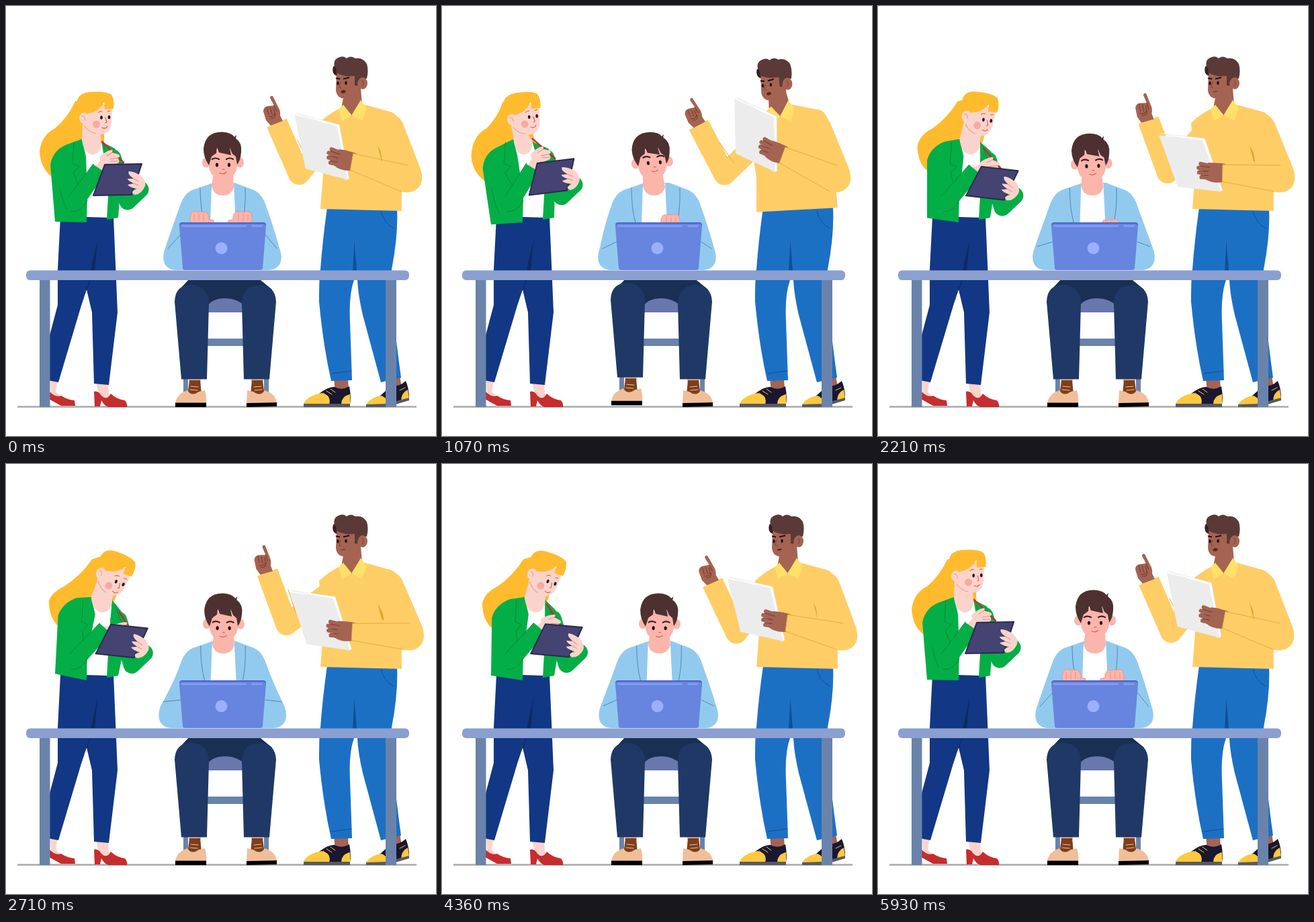
Write an HTML page that moves like this. It is 640 px wide and 640 px high and loops after 6000 ms.

```html
<!DOCTYPE html>
<html lang="en">
<head>
<meta charset="utf-8">
<title>Team at work</title>
<style>
html, body { margin: 0; width: 100%; height: 100%; overflow: hidden; background: #fff; }
svg { display: block; width: 100vw; height: 100vh; }
.l { fill: none; stroke-width: 1; stroke-linecap: round; stroke-linejoin: round; }
.arm { fill: none; stroke-linejoin: round; }
</style>
</head>
<body>
<svg viewBox="0 0 640 640">
<path d="M17 596.5H611" stroke="#a9a9a9" stroke-width="2.5"/>

<!-- standing man -->
<g>
  <path fill="#a56352" d="M488 554H509L510 572L490 574ZM570 552L586 550L589 568L572 572Z"/>
  <path fill="#1a1730" d="M466 577Q480 566 489 567Q500 573 511 566Q514 580 512 593H462ZM556 581Q566 572 573 566Q585 567 595 558Q600 570 600 583L570 593H550Z"/>
  <path fill="#ffc83e" d="M443 592Q448 580 470 576Q485 580 481 593H443ZM499 593Q499 580 512 578V593ZM536 593Q543 582 559 580Q570 585 566 593ZM588 588Q588 576 598 571L600 584Z"/>
  <path class="l" stroke="#ffc83e" d="M472 576l7 5M477 573l8 5M483 570l7 5M586 572l8 -4"/>
  <path fill="#555a66" d="M443 592H512V597H443ZM536 593L566 592L600 583V587L566 597H536Z"/>
  <path fill="#1c70c4" d="M478 300H582Q584 340 574 392V408Q575 460 588 553L558 560L531 460Q524 430 523 408H518Q510 430 512 470L515 557L484 558Q472 505 466 440Q466 400 468 392Q471 350 478 300Z"/>
  <path fill="#0d4f98" d="M518.5 350L516 394H522Z"/>
  <path class="l" stroke="#0d4f98" d="M558 305Q562 323 577 331M485 547L514 543"/>
  <path id="mNeck" fill="#a56352"/>
  <g id="mBody">
    <path fill="#ffcd66" d="M500 151L515 164L534 147L574 158Q588 164 588 200L589 305L468 302L472 250L466 174Q480 160 500 151Z"/>
    <path fill="#e0a52c" d="M553 207L559 231L568 236Z"/>
    <path fill="#ffe068" d="M502 147L495 153L500 171L515 163ZM528 140L537 152L530 171L514 163Z"/>
  </g>
  <g id="mHead">
    <path fill="#a56352" d="M492 99L491 125Q492 137 504 138Q520 138 528 127V99Z"/>
    <path fill="#3a1f20" d="M492 104Q484 101 487 90L494 88Z"/>
    <path fill="#5b3936" d="M491 99Q493 93 489 91Q486 79 497 76Q503 74 507 78Q513 73 520 78Q531 76 537 86Q540 96 537 108H529Q523 108 523 119L519 118V104Q503 106 491 99Z"/>
    <ellipse cx="531" cy="115" rx="7" ry="9" fill="#a56352"/>
    <path class="l" stroke="#7d4237" d="M530 111q4 3 0 8M498 113l-2 8 3 1"/>
    <path d="M491 107.5L497 108.5M502 108.5L511 106.5" stroke="#1d1015" stroke-width="2"/>
    <ellipse cx="494" cy="115" rx="1.700" ry="2.700" fill="#1d1015"/><ellipse cx="506" cy="114.500" rx="1.700" ry="2.700" fill="#1d1015"/>
    <ellipse id="mMouth" cx="502" cy="127.500" rx="3.500" fill="#5a2522" transform="rotate(-8 502 127)"/>
  </g>
  <path id="mArm" class="arm" stroke="#ffcd66" stroke-width="32"/>
  <path id="mArmLine" class="l" stroke="#e7ab3a"/>
  <g id="mFist">
    <path fill="#a56352" d="M383 157Q383 150 390 149L399 148L393 137Q393 133 397 134L405 150Q409 156 408 163L412 171L394 178L387 170Z"/>
    <path class="l" stroke="#74392f" d="M399 148l4 9M388 151l3 10M393 151l3 10M398 152l2 8q-3 6-9 4M401 160q0 8-7 7"/>
  </g>
  <g id="mGrip">
    <path fill="#fff" stroke="#e3e3e3" stroke-width=".6" d="M-81 -49H-15L20 25L15 28L-20 -43Z"/>
    <path fill="#ececec" d="M-83 -46H-18L18 27H-47Z"/>
    <g transform="rotate(-4)">
      <path fill="#a56352" d="M21 -13V13Q4 18 -8 11L-13 -6L-5 -14Q8 -15 21 -13Z"/>
      <path class="arm" stroke="#a56352" stroke-width="6" stroke-linecap="round" d="M0 -9L-16 -12M-2 -4L-19 -6M-3 2L-18 1M-3 8L-14 8"/>
      <path class="l" stroke="#74392f" d="M-2 -7L-17 -9M-4 -1L-18 -2M-4 5L-15 5"/>
    </g>
  </g>
  <path id="mSleeve" fill="#ffcd66"/>
  <path id="mSleeveLine" class="l" stroke="#e7ab3a"/>
</g>

<!-- woman -->
<g>
  <path fill="#fbd3cb" d="M66 555H77L74 574L84 584L67 578ZM134 560H152L153 577L162 584L140 585Z"/>
  <path fill="#c62d2f" d="M64 573Q73 583 82 580Q91 586 102 587L103 595H82L64 585ZM131 574Q137 572 142 580Q150 588 156 577Q164 585 177 587Q181 592 180 597H153Q146 595 142 587L140 596H132Z"/>
  <path fill="#123784" d="M81 314H160L164 408L166 456L153 564L131 562L128 456L120 422L112 446L78 560L62 557L65 490L77 445V392Z"/>
  <path fill="#0b2b60" d="M136 349L126 394H132Z"/>
  <path class="l" stroke="#0b2b60" d="M126 405L120 423"/>
  <path id="wTail" fill="#ffbb2e"/>
  <path id="wShirt" fill="#fff"/>
  <path id="wArmBack" class="arm" stroke="#03ae46" stroke-width="25" stroke-linecap="round"/>
  <path id="wPanel" fill="#03ae46"/>
  <path id="wJacket" fill="#03ae46"/>
  <path id="wLines" class="l" stroke="#068a36"/>
  <path id="wNeck" fill="#fbd3cb"/>
  <g id="wHead">
    <path fill="#fbd3cb" d="M115 158V178Q122 191 140 191.500Q155 191 157 174L158 148L130 144Z"/>
    <path fill="#ffbb2e" d="M109 163Q97 130 125 128Q148 126 157 132Q162 141 160 153L147 154L146 143Q138 158 122 160L119 164Z"/>
    <ellipse cx="116" cy="167" rx="7" ry="8.500" fill="#fbd3cb"/>
    <path class="l" stroke="#e09a92" d="M113 164q5 0 5 6M117 179q7 9 17 11"/>
    <g id="wFace">
      <circle cx="134.500" cy="176" r="5.500" fill="#f5aba0"/>
      <ellipse cx="142" cy="166" rx="1.900" ry="2.800" fill="#201a26"/><ellipse cx="153.500" cy="165.500" rx="1.900" ry="2.800" fill="#201a26"/>
      <path class="l" stroke="#b8741c" d="M137 159q3-3 6-2M151 157l4-1"/>
      <path class="l" stroke="#d2504b" d="M148 166l2 7-2 1M143 181q5 3 8-2"/>
    </g>
  </g>
  <path id="wWrist" class="arm" stroke="#fbd3cb" stroke-width="13"/>
  <g id="wHand">
    <path d="M-11 -25L21 6" stroke="#c62d2f" stroke-width="2.600" stroke-linecap="round"/>
    <path fill="#fbd3cb" d="M-15 -2Q-8 -10 3 -13Q6 -12 4 -9L14 -6Q17 -2 12 -1Q16 3 13 7L4 10H-12Z"/>
    <path class="l" stroke="#e48f88" d="M4 -9L-4 -4M13 -1L1 1M12 4H2"/>
  </g>
  <path id="wArm" class="arm" stroke="#03ae46" stroke-width="23"/>
  <path id="wArmLine" class="l" stroke="#068a36"/>
  <g id="wTablet">
    <path fill="#444372" stroke="#2b2a50" stroke-width="2" stroke-linejoin="round" d="M147 236L202 235L187 281L130 282Z"/>
    <path fill="#fbd3cb" d="M183 246Q190 246 200 252Q209 260 207 268Q202 280 192 281Q186 279 189 275L195 272Q184 270 181 266L190 264Q181 260 181 257L190 257Q180 250 183 246Z"/>
    <path class="l" stroke="#e48f88" d="M190 257l7 4M190 264l7 3"/>
  </g>
</g>

<!-- seated man -->
<g>
  <path id="sJacket" fill="#92caef"/>
  <path id="sShirt" fill="#fff"/>
  <path id="sLines" class="l" stroke="#5487ae"/>
  <path id="sNeck" fill="#fbb5ab"/>
  <g id="sHead">
    <ellipse cx="298" cy="233" rx="6" ry="7.500" fill="#fbb5ab"/><ellipse cx="348" cy="233" rx="6" ry="7.500" fill="#fbb5ab"/>
    <path fill="#fbb5ab" d="M302 215V240Q305 257 323 258Q341 257 344 240V215Z"/>
    <path fill="#4d302f" d="M302 237Q294 226 294 212Q297 187 322 187.500Q335 188 340 195L343 192L342 197Q352 204 350 218Q349 230 344 236L342 224L337 220L333 211L335 222L317 218L314 211L313 219L306 224Z"/>
    <g id="sFace">
      <path class="l" style="stroke-width:2.200" stroke="#3a2021" d="M307 228Q311 225 317 228M328 228Q333 225 338 228"/>
      <ellipse cx="314" cy="236.500" rx="2.100" ry="2.900" fill="#201519"/><ellipse cx="332" cy="236.500" rx="2.100" ry="2.900" fill="#201519"/>
      <path class="l" stroke="#d2504b" d="M322 243h3M318 248.500q5 3 10-1"/>
    </g>
  </g>
  <g id="sLeft"><path id="typing" fill="#fbb5ab" stroke="#e98983" stroke-width=".8" d="M274 326V315Q275 306 279 306Q283 304 286 307Q290 304 293 307Q298 305 300 309Q303 312 302 318L309 319V326ZM280 310v10M287 309v11M294 309v11"/></g>
  <g id="sRight"><use href="#typing" transform="matrix(-1 0 0 1 640 0)"/></g>
  <path fill="#6a83ab" d="M264 450h7v128h-7zM384 450h7v128h-7zM270 495h115v11h-115z"/>
  <path fill="#1a2f54" d="M275 404H374L396 422L350 448H302L258 422Z"/>
  <path fill="#6878ac" d="M300 456V446Q308 435 327 435Q346 436 354 446V456Z"/>
  <g id="sLeg">
    <path fill="#fbb5ab" d="M272 553h18v6h-18z"/>
    <path fill="#7d3f1a" d="M273 557H289L291 578L270 582Z"/>
    <path fill="#f0bf9a" d="M252 591Q254 577 270 572Q276 582 287 574L296 572Q299 580 298 591Z"/>
    <path class="l" stroke="#f0bf9a" d="M275 566l11 1M274 571l11 1"/>
    <path d="M252 590.500H298V597H252Z"/>
    <path fill="#1f3866" d="M251 440Q252 415 276 415Q302 417 302 443L299 555.500H261Z"/>
  </g>
  <path fill="#fbb5ab" d="M365 553h18v6h-18z"/>
  <path fill="#7d3f1a" d="M366 557H382L385 582L364 578Z"/>
  <path fill="#f0bf9a" d="M358 591L359 572L368 574Q379 582 385 572Q401 577 403 590Z"/>
  <path class="l" stroke="#f0bf9a" d="M369 567l11-1M370 572l11-1"/>
  <path d="M358 591L403 590V596L358 597Z"/>
  <path fill="#1f3866" d="M351 443Q351 417 377 415Q401 416 402 440L392 555.500H354Z"/>
</g>

<!-- desk -->
<path fill="#6785df" d="M258 328Q257 322 263 322H382Q388 322 387 328L382 390Q382 393 378 393H267Q263 393 263 390Z"/>
<path fill="#4d64c4" d="M258 326Q258 322 263 322H382Q387 322 387 326L383 324H262Z"/>
<path d="M262 327.500H357M366 327.500H381" stroke="#8fa2fb" stroke-width="2" stroke-linecap="round"/>
<circle cx="320.500" cy="360.500" r="9" fill="#9bafff"/>
<path fill="#6a83ab" d="M50 406H65.500V597H50ZM565 406H581V597H565Z"/>
<rect x="30" y="393.500" width="570" height="14.500" rx="6" fill="#8b9fd0"/>
</svg>
<script>
const LOOP = 6000;
const $ = id => document.getElementById(id);
const ease = u => u * u * (3 - 2 * u);
const path = (id, d) => $(id).setAttribute("d", d);
const move = (id, x, y, turn = 0, px = 0, py = 0) =>
  $(id).setAttribute("transform", `translate(${x} ${y}) rotate(${turn} ${px} ${py})`);

// Each pose is held from its first to its second time; every joint follows from its few values.
// turn of the torso, talking, pointing wrist x y, forearm angle, gripping hand x y, its angle
const man = [
  [0, 0, 0, 1, 403, 174, 23.5, 498, 228, 15],
  [1070, 1070, -5, 1, 382, 177, 27.5, 491, 215, 25],
  [1790, 1790, 0, 0, 413, 177, 20, 494, 247, 5],
  [2710, 2710, 0, 0, 389, 161, 20, 498, 248, 8],
  [3350, 3800, -1.2, .7, 403, 176, 23.5, 487, 238, 11],
  [5000, 5000, 1.5, 0, 402, 177, 27.5, 507, 228, 14]
];
// lean, nod, tilt of the tablet, writing hand x y
const woman = [
  [0, 0, 0, 0, 0, 154, 227],
  [650, 1070, -12, -5, -6, 147, 222],
  [1790, 1790, 8, 0, 8, 160, 230],
  [2710, 2710, 25, 24, 7, 173, 247],
  [3710, 3710, 23, 24, 6, 163, 234],
  [5000, 5000, 13, 18, 6, 160, 238]
];
// lean, drop of the head, spread of the elbows, left and right hand lowered
const seated = [
  [0, 0, 0, 0, 0, 0, 0],
  [1070, 1790, -10, 0, 0, 1, .2],
  [2710, 2710, 1, 5, 7, 1, 1],
  [3710, 3710, 3, 5, 2, 1, 1],
  [5000, 5000, -1, 5, 0, 1, 1]
];

function sample(poses, t) {
  const i = poses.findIndex(p => p[0] > t);
  const a = poses.at(i < 0 ? -1 : i - 1), b = poses[i < 0 ? 0 : i];
  const u = Math.max(0, (t - a[1]) / ((b[0] || LOOP) - a[1]));
  return a.map((v, n) => v + (b[n] - v) * ease(u)).slice(2);
}

// A point given relative to a turned origin
function around(x, y, deg, dx, dy) {
  const a = deg * Math.PI / 180, c = Math.cos(a), s = Math.sin(a);
  return [x + dx * c - dy * s, y + dx * s + dy * c];
}

function drawMan(t) {
  const [turn, talk, wx, wy, fore, gx, gy, tilt] = sample(man, t);
  const hx = 3.4 * turn, hy = -.4 * turn, c = 2.5 * turn;
  const [ex, ey] = around(wx, wy, -fore, 0, 83);
  const [tx, ty] = around(gx, gy, tilt, 16, -13), [bx, by] = around(gx, gy, tilt, 18, 12);
  const dx = gx - 498 + (15 - tilt) * .4;
  move("mHead", hx, hy, turn * .9, 515, 110);
  move("mBody", 0, 0, turn * .9, 528, 304);
  $("mMouth").setAttribute("ry", .6 + 1.7 * talk);
  path("mNeck", `M${503 + hx} ${132 + hy}L${528 + hx} ${122 + hy}L${530 + c} 147L${515 + c} 167L${499 + c} 152Z`);
  path("mArm", `M488 186L${ex} ${ey}L${wx} ${wy}`);
  path("mArmLine", `M${ex + 14} ${ey - 17}L${wx + 31} ${wy + 26}`);
  move("mFist", wx - 403, wy - 174, 1.6 * (23.5 - fore), 397, 162);
  move("mGrip", gx, gy, tilt);
  path("mSleeve", `M${570 + c} 158Q${587 + c} 163 ${592 + c} 178L${616 + dx} 240Q${624 + dx} 262 ${612 + dx} 272` +
    `Q${605 + dx} 279 ${591 + dx} 277L${bx} ${by}L${tx} ${ty}L${560 + dx} 233L${553 + c} 180Z`);
  path("mSleeveLine", `M${598 + dx} 237L${tx} ${ty}L${bx} ${by}L${588 + dx} 276`);
}

function drawWoman(t) {
  const [lean, nod, tilt, kx, ky] = sample(woman, t);
  const x = 116 + lean, y = 167 - .18 * lean;
  const half = .55 * lean, rise = .35 * lean;
  const cx = 113 + half, rx = 142 + .63 * lean, ox = 162 + rise, oy = 212 + Math.max(0, rise * .7);
  const sx = 78 + half, sy = 211 - .27 * lean, dx = 66 + .46 * lean, dy = 236 - .42 * lean;
  const wx = 139 + rise, wy = 242 + .1 * lean;
  const gx = .25 * lean, gy = 1.2 * tilt;
  const ax = 103 + lean, bx = 73 + half, tipX = 50 + half, tipY = 216 - .45 * lean;

  move("wHead", lean, y - 167, nod, 116, 167);
  move("wFace", 0, nod * .13);
  path("wTail", `M${x + 14} ${y - 30}L${ax} 142Q${(ax + bx) / 2 + 4} 166 ${bx} 182Q${tipX + 3} 192 ${tipX} ${tipY}` +
    `Q${tipX + 1} ${tipY + 25} ${68 + rise} ${254 - half}L${rx + 4} 203L${x + 30} ${y + 15}Z`);
  path("wShirt", `M${cx} 198L${rx} 203L${ox} ${oy + 20}L153 315L120 314Z`);
  path("wArmBack", `M${ox - 3} ${oy + 14}L${181 + gx} ${291 + gy}L${200 + gx} ${273 + gy}`);
  path("wPanel", `M${rx} 202L${ox} ${oy}Q${ox + 9} ${oy + 14} ${ox + 11} ${oy + 26}L167 315L150 318L153 265Z`);
  path("wJacket", `M${cx} 198L${sx + 13} ${sy - 5}Q${sx - 8} ${sy + 3} ${dx} ${dy}L73 ${321 - rise}L120 322L121 282L${cx + 6} 224Z`);
  path("wLines", `M${cx - 12} 203l-2 32l10 4l-9 9L117 288M${dx + 13} ${dy + 26}q3 24 11 40M${rx + 4} 209l10 26`);
  path("wNeck", `M${x - 2} ${y + 3}L${x + 24} ${y + 22}L${rx} 201Q${rx + 1} 220 ${(cx + rx) / 2} 221Q${cx + 2} 218 ${cx} 198Z`);
  path("wWrist", `M${wx - 3} ${wy + 3}L${kx - 4} ${ky + 2}`);
  move("wHand", kx, ky, nod * .6);
  path("wArm", `M${dx + 14} ${dy + 4}L102 295L${wx} ${wy}`);
  path("wArmLine", `M${wx - 9} ${wy - 7}L94 283M97 306Q112 307 121 289`);
  move("wTablet", gx, .7 * tilt, tilt, 166, 258);
}

function drawSeated(t) {
  const [lean, drop, spread, left, right] = sample(seated, t);
  const n = 323 + .7 * lean, r = 323 + .2 * lean;
  const el = r - 89 - spread, er = r + 87 + spread, inY = 340 + 11 * left, outY = 361 - spread;
  move("sHead", lean, drop, lean * .4, 323, 235);
  move("sFace", -.3 * lean, drop * .5 + lean * .3);
  path("sJacket", `M${n - 17} 264L${n - 46} 274Q${n - 59} 280 ${n - 65} 300Q${n - 74} 325 ${el + 3} 360C${el - 5} 382 ${el + 5} 394 ${el + 22} 393` +
    `H${er - 22}C${er - 5} 394 ${er + 5} 382 ${er - 3} 360Q${r + 74} 325 ${r + 65} 300Q${r + 59} 280 ${r + 46} 274L${r + 17} 263Z`);
  path("sShirt", `M${n - 17} 267L${n - 19} 325H${n + 19}L${n + 16} 264Z`);
  path("sLines", `M${n - 34} 271Q${n - 34} 300 ${n - 28} 323M${r + 33} 271Q${r + 34} 300 ${r + 29} 323` +
    `M${el + 7} ${outY}L260 ${inY}M${er - 7} ${outY}L386 ${inY}`);
  path("sNeck", `M${309 + lean} ${248 + drop}H${338 + lean}L${n + 16} 270Q${n + 12} 282 ${n} 282Q${n - 14} 282 ${n - 17} 268Z`);
  move("sLeft", 0, 22 * left);
  move("sRight", 1.2 * lean, 22 * right);
  const tap = t < 2000 ? Math.sin(Math.PI * t / 667) ** 2 : 0;
  move("sLeg", 0, -3.2 * tap);
}

function frame() {
  const t = performance.now() % LOOP;
  drawMan(t);
  drawWoman(t);
  drawSeated(t);
  requestAnimationFrame(frame);
}
frame();
</script>
</body>
</html>
```
